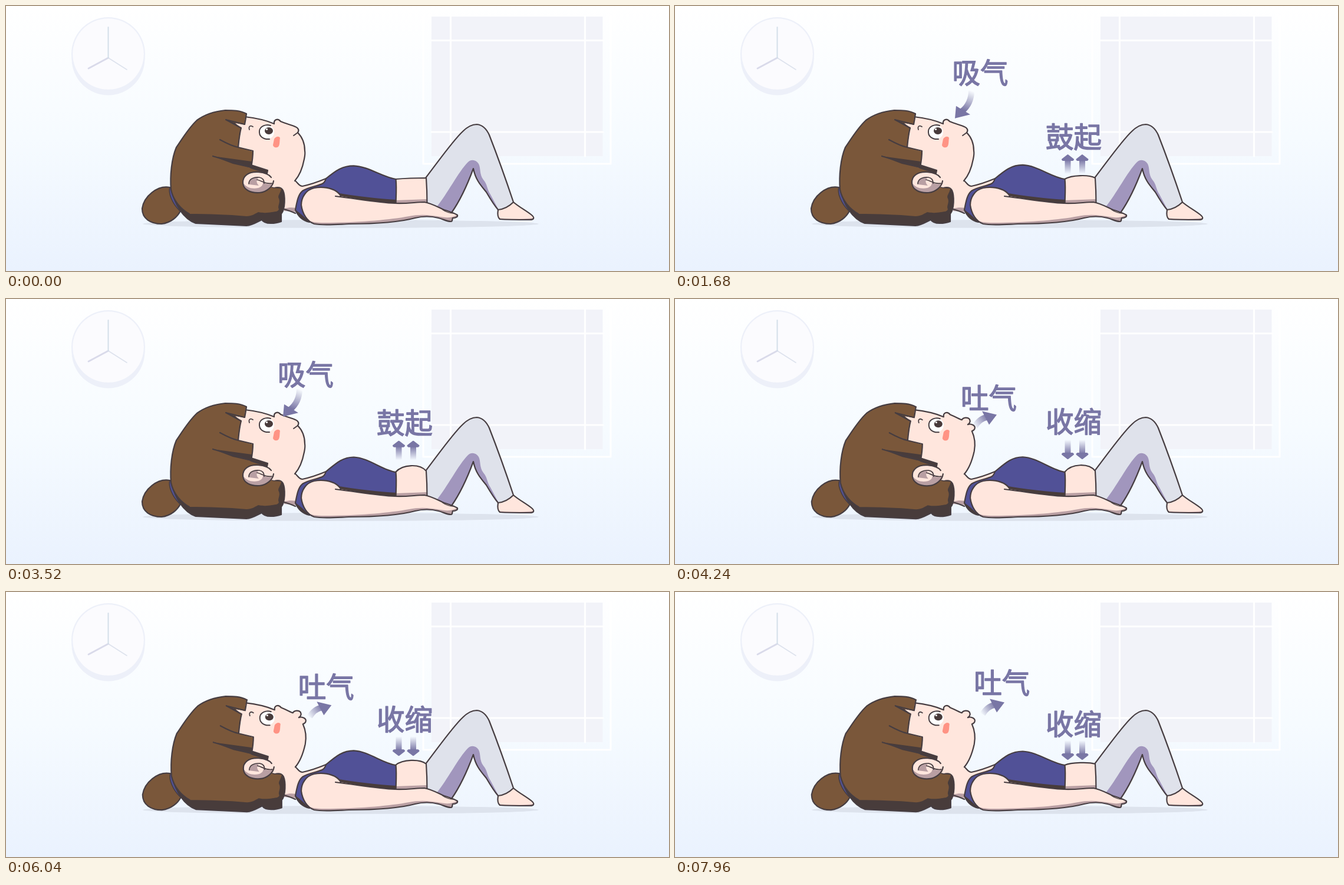
An HTML page with a canvas for the animation above (8000 ms loop, 1125x450 px).

```html
<!DOCTYPE html>
<html lang="zh">
<head>
<meta charset="utf-8">
<style>
html, body { margin: 0; width: 100%; height: 100%; overflow: hidden; background: #fff; }
canvas { display: block; width: 1125px; height: 450px; }
</style>
</head>
<body>
<canvas id="stage" width="1125" height="450"></canvas>
<script>
const ctx = document.getElementById('stage').getContext('2d');
const LOOP = 8000, STEP = 40, EXHALE = 4000;
const INK = '#463d41', SKIN = '#ffe6dd', SKIN_SHADE = '#b99fa3', HAIR = '#7a573a', HAIR_SHADE = '#483c3b';
const SUIT = '#515197', PANTS = '#dfe2eb', PANTS_SHADE = '#a196bd', LABEL = '#7976a5';

function fill(d, color) {
  ctx.fillStyle = color;
  ctx.fill(new Path2D(d));
}

function line(d, width = 2.2, color = INK) {
  ctx.strokeStyle = color;
  ctx.lineWidth = width;
  ctx.stroke(new Path2D(d));
}

function shape(d, color, width) {
  fill(d, color);
  line(d, width);
}

// Fills a shape and shades the parts of it covered by a second shape.
function shaded(d, color, shade, shadeColor) {
  fill(d, color);
  ctx.save();
  ctx.clip(new Path2D(d));
  fill(shade, shadeColor);
  ctx.restore();
}

function disc(x, y, rx, ry, color) {
  ctx.fillStyle = color;
  ctx.beginPath();
  ctx.ellipse(x, y, rx, ry, 0, 0, 7);
  ctx.fill();
}

function drawRoom() {
  const sky = ctx.createLinearGradient(0, 0, 0, 450);
  sky.addColorStop(0, '#ffffff');
  sky.addColorStop(0.5, '#f6fbff');
  sky.addColorStop(1, '#eaf2fe');
  ctx.fillStyle = sky;
  ctx.fillRect(0, 0, 1125, 450);

  disc(173.5, 89.5, 62, 62, '#edf0f9');
  disc(173.5, 81.5, 62.5, 62.5, '#edf0f9');
  disc(173.5, 81.5, 60.3, 60.3, '#fbfbfe');
  line('M173.5 88L205 108', 1.6, '#dde2ed');
  line('M173.5 88L140 106', 2.8, '#d9daea');
  line('M173.5 88V36', 2, '#d3dfe9');

  line('M708 17V268H1026V17', 3, '#ffffff');
  ctx.fillStyle = '#f2f3f9';
  ctx.fillRect(722, 18, 290.5, 237);
  line('M722 58.5H1013M722 214H1013M754.5 17V255M982.5 17V255', 3, '#ffffff');
  disc(568, 370, 336, 7, '#dde3ed');
}

function drawLegs() {
  const pants = 'M712 292C735 262 758 229 775 213C784 204 791 201 799 201C809 202 815 208 820 219C836 260 850 300 861 333C854 340 845 345 835 346C828 338 822 328 815 316C808 307 797 297 793 276C786 295 775 324 756 351L714 336Z';
  shaded(pants, PANTS,
    'M731 341C748 320 769 280 783 266C788 260 797 260 802 268C806 276 803 286 810 295C817 303 816 311 822 320L838 350H731Z', PANTS_SHADE);
  line('M712 292C735 262 758 229 775 213C784 204 791 201 799 201C809 202 815 208 820 219C836 260 850 300 861 333M835 346C828 338 822 328 815 316C808 307 797 297 793 276C786 295 775 324 756 351');
  const foot = 'M835 346C845 345 854 340 861 333C870 341 882 347 892 355C898 360 895 363 889 363C870 363 852 363 838 362C834 359 834 352 835 346Z';
  shaded(foot, SKIN, 'M834 360C855 362 872 362 898 360V366H834Z', SKIN_SHADE);
  line(foot);
}

function drawTorso(lift) {
  const belly = 293 - 14.5 * lift, chest = 271.3 - 3.2 * lift;
  const waist = `M661 294C673 ${belly} 702 ${belly - 1} 713 292C714 306 714.5 320 714.5 336H661Z`;
  shaded(waist, SKIN, 'M660 330L715 328V337H660Z', SKIN_SHADE);
  line(waist);

  fill('M470 300L490 296C496 301 497 306 503 306C517 303 531 298 543 293L560 320L495 350L470 346Z', SKIN);
  fill('M472 344C479 342 486 342 492 343L494 350L472 348Z', SKIN_SHADE);
  line('M472 345C479 347 485 349 491 352');
  line('M490 296C496 301 497 306 503 306C517 303 531 298 543 293');

  const top = `M543 293C560 279 571 ${chest} 590 ${chest}C615 ${chest + 1} 639 291 661.5 294C663 307 662 321 661.5 335C630 333 590 329 560 324L515 367C502 364 495 356 491 346C494 330 496 320 503 314C513 307 530 306 538 301C541 299 542 296 543 293Z`;
  shaded(top, SUIT, 'M560 317C595 323 630 327 663 329V338L560 330ZM490 345C500 352 508 360 517 369H494Z', HAIR_SHADE);
  line(top);
}

function drawArm() {
  const edge = 'C600 328 632 334 660 335C680 336 696 333 710 333C722 335 734 342 743 346C752 349 762 352 766 355C767 358 763 360 758 360C757 362 758 366 755 366C748 366 742 362 734 360C722 357 710 356 694 360C668 367 622 370 582 370C560 371 538 373 523 370C511 366 503 353 501 338C501 325 509 312 523 309C537 306 552 309 561 315C565 318 567 320 568 323';
  shaded('M568 323' + edge, SKIN,
    'M505 359C518 369 530 368 550 368C605 367 652 363 684 357C704 353 720 355 738 358C747 360 757 360 767 354V374H510Z', SKIN_SHADE);
  line('M559 323' + edge);
  line('M741 346C748 351 753 352 760 352', 1.5);
}

function drawFace(exhaling) {
  const mouth = exhaling
    ? 'C478 201 482 204 486 205C488 201 496 200 499 204C501 208 499 211 496 213C501 211 508 214 508 218C508 221 506 223 503 224C508 235 509 247 507 258'
    : 'C475 200 485 202 491 205C496 207 498 211 495 215C502 222 507 233 507 246C508 251 507 255 506 260';
  const profile = 'M405 188C423 190 441 194 455 200C454 193 461 190 466 196' + mouth + 'C503 276 498 288 490 297';
  fill(profile + 'L472 320L420 305L390 240L394 196Z', SKIN);
  line(profile);
  if (!exhaling) line('M495 215L488 220', 2);

  disc(442, 214, 13, 12.5, '#fff');
  line('M449 203C441 200 431 204 430 212C429 221 436 227 447 226', 2);
  disc(446, 212, 7, 6, '#493b3b');
  disc(442.5, 209.5, 1.6, 1.4, '#fff');
  line('M413 210C411 204 415 202 419 205', 1.8);
  fill('M455 226C457 222 463 220 465 224C464 229 465 236 462 239C458 242 453 239 453 236Z', '#ff9384');
}

function drawHair() {
  const bun = 'M278 308C257 304 234 323 231 344C231 361 245 370 264 370C280 368 291 358 296 348C288 334 281 322 278 308Z';
  shape(bun, HAIR);
  shape('M278 308C275 318 282 335 294 347L299 343C289 334 283 320 281 309Z', SUIT, 1.6);

  const back = 'M281 314C287 337 300 361 322 369L408 373C419 372 427 366 434 363C437 368 443 369 449 369C455 369 462 368 467 366L467 353C474 345 474 322 470 313C467 308 462 307 455 309L410 300Z';
  shape(back, HAIR_SHADE);

  const outline = 'M408 183C397 177 385 177 372 177C352 179 336 185 324 194C310 207 300 224 289 240C281 259 278 288 280 312C284 331 297 345 311 353';
  fill(outline + 'C345 353 375 354 408 357C417 357 422 353 428 350C438 352 445 351 451 350C458 349 462 349 463 345C460 340 466 334 463 327C460 322 466 318 467 310L452 309L428 283L443 282L417 272L419 247L394 240L399 207L389 199L405 202C405 195 406 189 408 183Z', HAIR);
  line(outline);
  fill('M351 255L417 264L416 275L385 268ZM416 270L444 279L443 284L414 275ZM372 193L399 202L398 208Z', HAIR_SHADE);
  fill('M389 199L405 202L399 207Z', SKIN);
  line('M408 183C407 190 406 196 405 201L373 193L399 207C396 218 395 230 394 240M363 227C374 233 384 238 394 240L419 246C419 255 418 263 416 274L351 255M416 270L444 279L443 284L416 275');

  const ear = 'M453 298C451 287 442 283 428 282C411 281 401 289 402 301C403 312 415 318 430 317C442 316 452 309 454 299Z';
  shaded(ear, SKIN, 'M402 300C408 309 418 311 428 309C434 307 436 304 436 299C444 304 450 303 456 299V320H400ZM413 303C412 295 419 291 428 292C424 296 425 301 429 305Z', SKIN_SHADE);
  fill('M444 283L458 298L452 300Z', SKIN);
  line('M454 297C453 307 442 316 430 317C415 318 403 312 402 301C401 289 411 281 428 282C439 283 446 285 450 291');
  line('M412 302C412 293 422 290 430 291C436 292 438 296 438 301M426 295C433 296 440 303 451 301', 1.7);
}

function label(text, left, top) {
  ctx.font = '400 47.5px "Noto Sans CJK SC", "Noto Sans CJK", sans-serif';
  ctx.fillStyle = ctx.strokeStyle = LABEL;
  ctx.lineWidth = 1.5;
  ctx.fillText(text, left - 2, top + 41);
  ctx.strokeText(text, left - 2, top + 41);
}

// Gradient from transparent at (x0, y0) to full colour at (x1, y1).
function fade(x0, y0, x1, y1) {
  const g = ctx.createLinearGradient(x0, y0, x1, y1);
  g.addColorStop(0, 'rgba(121,118,165,0)');
  g.addColorStop(1, LABEL);
  return g;
}

// Breath arrow placed by its tip.
function breathArrow(x, y, tail, head, gradient) {
  ctx.save();
  ctx.translate(x, y);
  ctx.lineCap = 'butt';
  line(tail, 10, gradient);
  fill(head, LABEL);
  ctx.restore();
}

// A pair of arrows with the tips at the given height; dir 1 points up, -1 down.
function bellyArrows(tip, dir) {
  for (const x of [666.5, 691]) {
    ctx.save();
    ctx.translate(x, tip);
    ctx.scale(1, dir);
    ctx.fillStyle = fade(0, 33, 0, 9);
    ctx.fillRect(-5, 8, 10, 25);
    const head = 'M0 1.5L-9 8.5L-8 9.5H8L9 8.5Z';
    fill(head, LABEL);
    line(head, 3, LABEL);
    ctx.restore();
  }
}

function drawInhale(t) {
  label('吸气', 481 - 5.1 * t, 76.6 + 8 * t);
  breathArrow(479.5 - 2.7 * t, 182.5 + 4.9 * t, 'M28 -47C28 -33 23 -21 12 -12', 'M2 -21L26 -6.5L0 0Z', fade(28, -47, 14, -14));
  label('鼓起', 631, 209.5 - 6.3 * t);
  bellyArrows(262.5 - 6.2 * t, 1);
}

function drawExhale(t) {
  const dt = t - 4.24;
  label('吐气', 487 + 6 * dt, 145.3 - 3.9 * dt);
  breathArrow(546 + 3.5 * dt, 196.5 - 2.4 * dt, 'M-37 20C-32 11 -26 6 -16 4', 'M-25 -6L0 0L-13 17Z', fade(-39, 20, -15, 4));
  label('收缩', 631, 185 + 4.3 * dt);
  bellyArrows(272 + 3.5 * dt, -1);
}

function draw(ms) {
  const t = ms / 1000, exhaling = ms >= EXHALE;
  const lift = exhaling ? 1 - 0.19 * (t - 4) : t / 4;
  ctx.lineCap = ctx.lineJoin = 'round';
  drawRoom();
  drawLegs();
  drawTorso(lift);
  drawArm();
  ctx.save();
  if (exhaling) ctx.translate(0.8, 0.2);
  drawFace(exhaling);
  drawHair();
  ctx.restore();
  if (exhaling) drawExhale(t);
  else if (ms >= STEP) drawInhale(t);
}

function tick() {
  const ms = performance.now() % LOOP;
  draw(Math.floor(ms / STEP) * STEP);
  requestAnimationFrame(tick);
}
tick();
</script>
</body>
</html>
```
